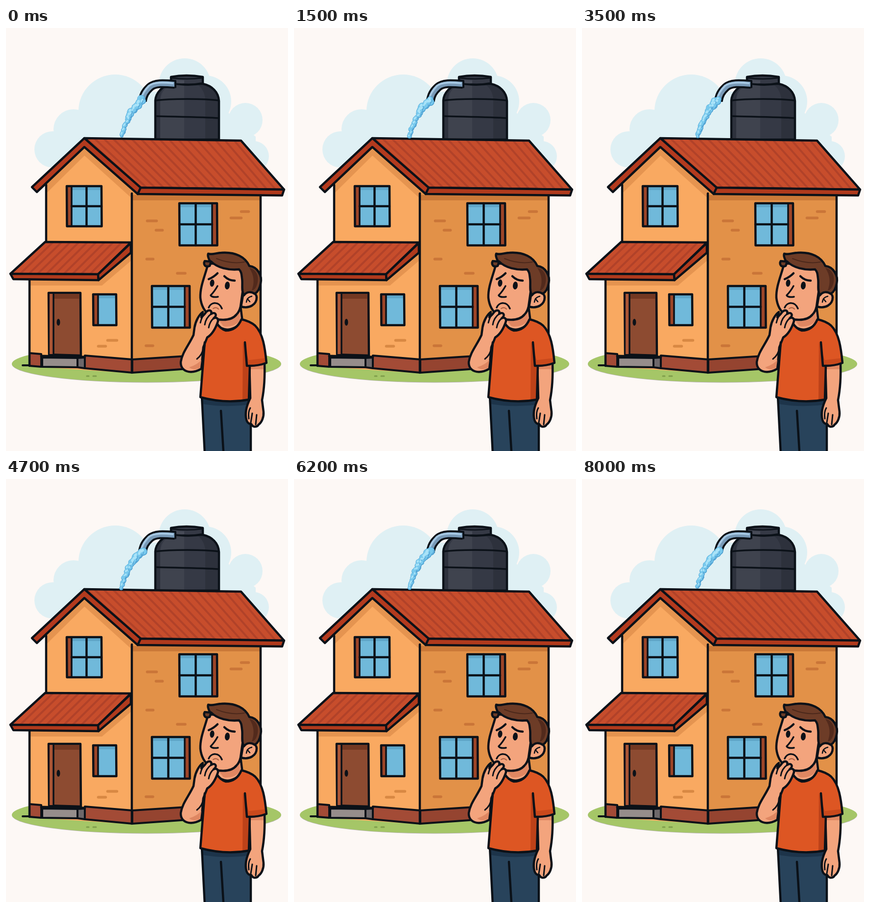
An HTML page with a canvas for the animation above (8.1 s loop, 576 by 864 pixels).

```html
<!DOCTYPE html>
<html lang="en">
<head>
<meta charset="utf-8">
<title>Overflowing tank</title>
<style>
html, body { margin: 0; width: 100%; height: 100%; overflow: hidden; background: #fdf8f5; }
canvas { display: block; width: 100vw; height: 100vh; }
</style>
</head>
<body>
<canvas id="stage" width="576" height="864"></canvas>
<script>
const W = 576, H = 864, LOOP = 8100, STEP = 100, TAU = Math.PI * 2;
const INK = '#0b1118';
const stage = document.getElementById('stage').getContext('2d');
const scene = document.createElement('canvas');
scene.width = W;
scene.height = H;
const g = scene.getContext('2d');
g.lineJoin = g.lineCap = 'round';

function shape(d, fill, width = 4.5, ink = INK) {
  const path = new Path2D(d);
  if (fill) { g.fillStyle = fill; g.fill(path); }
  if (width) { g.strokeStyle = ink; g.lineWidth = width; g.stroke(path); }
}
const line = (d, width = 4.5, ink = INK) => shape(d, null, width, ink);
const flat = (d, fill) => shape(d, fill, 0);

function oval(c, x, y, rx, ry, fill, turn = 0) {
  c.fillStyle = fill;
  c.beginPath();
  c.ellipse(x, y, rx, ry, turn, 0, TAU);
  c.fill();
}

function clipped(d, draw) {
  g.save();
  g.clip(new Path2D(d));
  draw();
  g.restore();
}

function sky() {
  g.fillStyle = '#fdf8f5';
  g.fillRect(0, 0, W, H);
  const puffs = [[95, 248, 37], [138, 207, 41], [223, 170, 75], [365, 115, 53],
    [407, 150, 53], [489, 188, 35], [506, 262, 31]];
  for (const [x, y, r] of puffs) oval(g, x, y, r, r, '#dff0f4');
  flat('M95 211H138L223 130H420L460 180L510 222V285H95Z', '#dff0f4');
  oval(g, 287, 686.5, 275, 38, '#b9b3b9');
  oval(g, 287, 686, 275, 37.5, '#a5c667');
  line('M34 689H50', 4);
  line('M165 711H169M178 711H184', 3, '#7f9d4b');
}

function tank() {
  const body = 'M305 228V148C306 132 320 118 337 114H402C421 118 434 131 435 149V228Z';
  flat(body, '#353945');
  clipped(body, () => {
    flat('M305 228V110H336C318 122 314 134 315 150V228Z', '#2d313c');
    flat('M315 228V150C316 132 324 122 338 114H364V228Z', '#3f434e');
    flat('M407 228V145C406 130 398 120 388 112H440V228Z', '#2d313c');
  });
  line(body);
  line('M306 148C335 144 405 144 434 148M306 180C335 181 405 182 434 184', 3.5);
  shape('M337 100Q368 94 402 100V113Q370 119 337 112Z', '#353945');
  line('M337 102Q370 106 401 102', 2.5);
  flat('M342 105Q352 107 364 107V113Q352 114 342 111Z', '#474b57');
  const pipe = 'M345 115C320 113 304 112 294 121C284 130 281 137 279 147';
  g.lineCap = 'butt';
  line(pipe, 18);
  line(pipe, 10, '#7899b6');
  line('M342 113C320 111 303 110 292 118C283 127 278 137 276 144', 4, '#a5c7e2');
  g.lineCap = 'round';
  line('M346 108V121M272 146L286 149', 4);
}

function windowAt(x, y, w, h, side, cross) {
  const strip = 10, left = side < 0;
  const gx = left ? x + strip : x, gw = w - strip;
  g.fillStyle = '#9d4528';
  g.fillRect(x, y, w, h);
  g.fillStyle = '#70b9da';
  g.fillRect(gx, y, gw, h);
  g.fillStyle = '#5fa6c8';
  g.fillRect(gx, y, gw, 8);
  line(`M${x} ${y}h${w}l.5 ${h}h${-w}Z`);
  line(`M${left ? gx : gx + gw} ${y}v${h}`, 3.5);
  if (cross) line(`M${gx + gw / 2} ${y}v${h}M${gx} ${y + h / 2}h${gw}`);
}

function brick(x, y, w, ink) {
  line(`M${x - w / 2 + 3} ${y}h${w - 6}`, 5.5, ink);
}

// Corrugation lines run from the ridge to the eave.
function stripes(n, x1, x2, y1, x3, x4, y2) {
  for (let i = 1; i < n; i++) {
    const k = i / n;
    line(`M${x1 + (x2 - x1) * k} ${y1}L${x3 + (x4 - x3) * k} ${y2}`, 4, '#b14229');
  }
}

function house() {
  flat('M257 325H520V675L398 694L257 705Z', '#e29148');
  flat('M258 341H520V352H258Z', '#cb7938');
  const front = 'M82 435V312L160 234L257 322V705L48 691V512Z';
  flat(front, '#f9a961');
  clipped(front, () => {
    line('M66 342L160 249L272 350', 17, '#e59450');
    flat('M48 512H190L257 455V474L196 526H48Z', '#e59450');
  });
  for (const b of [[298, 394, 25], [313, 413, 19], [294, 472, 19], [358, 501, 22],
    [293, 649, 20], [488, 375, 21], [470, 388, 27]]) brick(...b, '#ca7538');
  brick(217, 638, 25, '#d88843');
  brick(196, 650, 21, '#d88843');

  shape('M48 664L72 666V692L48 690Z', '#a34b36', 4);
  shape('M161 669L258 677V704L161 695Z', '#a34b36', 4);
  shape('M258 677L400 668V694L258 704Z', '#954430', 4);
  line('M82 320V436M48 514V690M257 338V704M520 340V672');

  windowAt(124, 323, 71, 82, -1, true);
  windowAt(354, 358, 77, 86, 1, true);
  windowAt(298, 527, 77, 85, 1, true);
  windowAt(178, 544, 47, 63, -1, false);

  shape('M87 541L152 541L153 669L88 667Z', '#8d4b31');
  flat('M98 543H150V553H98Z', '#733822');
  flat('M89 543H96V666H89Z', '#aa5535');
  line('M97 542V667', 3.5);
  oval(g, 107, 601, 3.5, 7, INK);
  shape('M74 673L146 674V693L74 692Z', '#968d8b', 4);
  shape('M146 674L161 673V695L146 693Z', '#6e686b', 4);
  line('M72 670L161 672', 5);

  const roof = 'M160 225L480 230L568 330L273 326Z';
  flat(roof, '#c74d2c');
  clipped(roof, () => {
    stripes(17, 160, 480, 224, 274, 568, 330);
    line('M160 225L273 326', 8, '#ad3c22');
  });
  line(roof);
  shape('M273 326L568 330L564 342L269 339Z', '#b03a1d');
  shape('M160 225L53 325L63 335L160 243L269 339L275 326Z', '#b33a1e');

  const porch = 'M80 437L255 438L188 503L9 502Z';
  flat(porch, '#c74d2c');
  clipped(porch, () => stripes(10, 80, 256, 436, 9, 188, 504));
  line(porch);
  shape('M9 502L188 503L189 515L15 513Z', '#b03a1d');
  shape('M188 503L255 439V459L189 515Z', '#b03a1d');
}

function person() {
  const skin = '#f3a47d', shade = '#df8762';
  const jeans = 'M400 753L406 870H500V753Z';
  flat(jeans, '#28435b');
  flat('M401 757H499V769Q450 776 402 768Z', '#1d344a');
  line(jeans);
  line('M439 782L444 864');

  shape('M497 682L499 756C493 768 487 785 491 800C493 808 499 809 501 809C505 817 513 815 516 810C522 806 527 795 526 784L523 760C528 735 529 710 528 682Z', skin);
  flat('M499 689H526V697H500Z', shade);
  line('M500 806L503 787M510 810L512 790M499 776Q494 784 496 798', 3);

  shape('M434 575L431 607Q454 628 483 600L478 560Z', skin);
  flat('M435 597Q459 603 477 580L479 598Q462 613 444 609Z', shade);

  const shirt = 'M430 602C414 609 407 622 406 641L397 754Q448 768 496 759L498 690Q516 690 532 684C529 653 525 624 509 608C500 600 490 597 481 595Q471 618 449 618Q437 614 430 602Z';
  flat(shirt, '#dd5623');
  clipped(shirt, () => {
    flat('M484 640L499 690V764H483Z', '#bd4219');
    flat('M490 679L532 674V688L492 693Z', '#c9491c');
  });
  line(shirt);
  line('M488 642L492 690L498 690');

  shape('M413 481C407 505 396 528 397 551C399 569 407 580 416 586C428 599 459 600 471 585C477 579 478 573 479 569L488 505L466 482Z', skin);
  shape('M484 546C492 534 511 538 512 550C512 565 497 574 480 569Z', skin);
  line('M502 548Q492 550 491 560M493 553L498 559', 2.5);
  shape('M416 486C405 490 403 481 406 476L417 477C413 470 411 465 413 461C422 464 429 459 440 459C469 457 489 468 497 486C514 488 524 506 520 522C518 535 513 540 508 543C500 537 491 539 486 546C480 536 484 523 482 511C481 503 481 498 476 493C454 495 432 490 419 477Z', '#6d3c27');
  flat('M497 490C510 492 517 506 514 519C512 530 507 536 502 536C508 520 507 505 497 490Z', '#522a1c');
  line('M430 471Q460 483 487 478', 2, '#4c281b');

  oval(g, 421, 521, 4.5, 7.5, INK, .1);
  oval(g, 452, 526, 5, 8, INK, .1);
  line('M414 513Q424 509 432 501M446 507Q455 516 467 516');
  line('M432 527Q426 538 418 546Q421 551 433 549', 3.5);
  line('M414 571C419 559 435 558 441 573', 3.5);
  line('M423 573Q429 569 434 574', 2, '#a65c40');

  const arm = 'M402 580C394 586 387 599 385 612L383 627C374 647 360 662 357 682C356 701 376 709 399 696L403 652L411 632C421 626 428 614 433 599C434 593 429 590 424 593C433 586 427 579 419 584C421 577 415 574 409 580C405 586 402 588 399 591Z';
  shape(arm, skin);
  flat('M374 693Q391 688 401 676L399 693Q384 701 374 693Z', shade);
  line('M404 651Q401 668 390 676', 3);
  line('M409 580Q400 588 397 602M419 584Q408 592 406 606M424 593Q416 600 414 612', 3);
  line('M406 642L399 696');
}

function seeded(seed) {
  return () => {
    seed = (seed * 16807) % 2147483647;
    return seed / 2147483647;
  };
}
const rand = seeded(4271);
const drops = Array.from({ length: 34 }, (_, i) => ({
  start: (i + rand() * .7) / 34, size: .75 + rand() * .5,
  side: rand() * 2 - 1, phase: rand() * TAU
}));

function drop(d, time) {
  const k = (d.start + time * 10) % 1, u = 1 - k;
  const wobble = Math.sin(d.phase + time * TAU * 27);
  const spread = (4 - 2.6 * k) * (d.side * .75 + wobble * .35);
  return {
    x: u * u * 279 + 2 * u * k * 251 + k * k * 235 + spread,
    y: u * u * 146 + 2 * u * k * 168 + k * k * 223 + spread * .45,
    r: (6.4 - 3 * k) * d.size
  };
}

function water(time) {
  const blobs = drops.map(d => drop(d, time));
  for (const b of blobs) oval(stage, b.x, b.y, b.r + .8, b.r + .8, '#4b9fd1');
  for (const b of blobs) oval(stage, b.x - .4, b.y - .5, b.r - .2, b.r - .2, '#78c9ed');
  blobs.forEach((b, i) => {
    if (i % 3 === 0) {
      stage.strokeStyle = '#529fd0';
      stage.lineWidth = 1.3;
      stage.beginPath();
      stage.arc(b.x, b.y, b.r * .75, -.5, 1.4);
      stage.stroke();
    } else {
      oval(stage, b.x - b.r * .3, b.y - b.r * .3, b.r * .4, b.r * .5, '#aae3f8', .6);
    }
  });
}

function frame(now) {
  const time = Math.floor((now % LOOP) / STEP) * STEP / LOOP;
  stage.drawImage(scene, 0, 0);
  water(time);
  requestAnimationFrame(frame);
}

sky();
tank();
house();
person();
frame(0);
</script>
</body>
</html>
```
